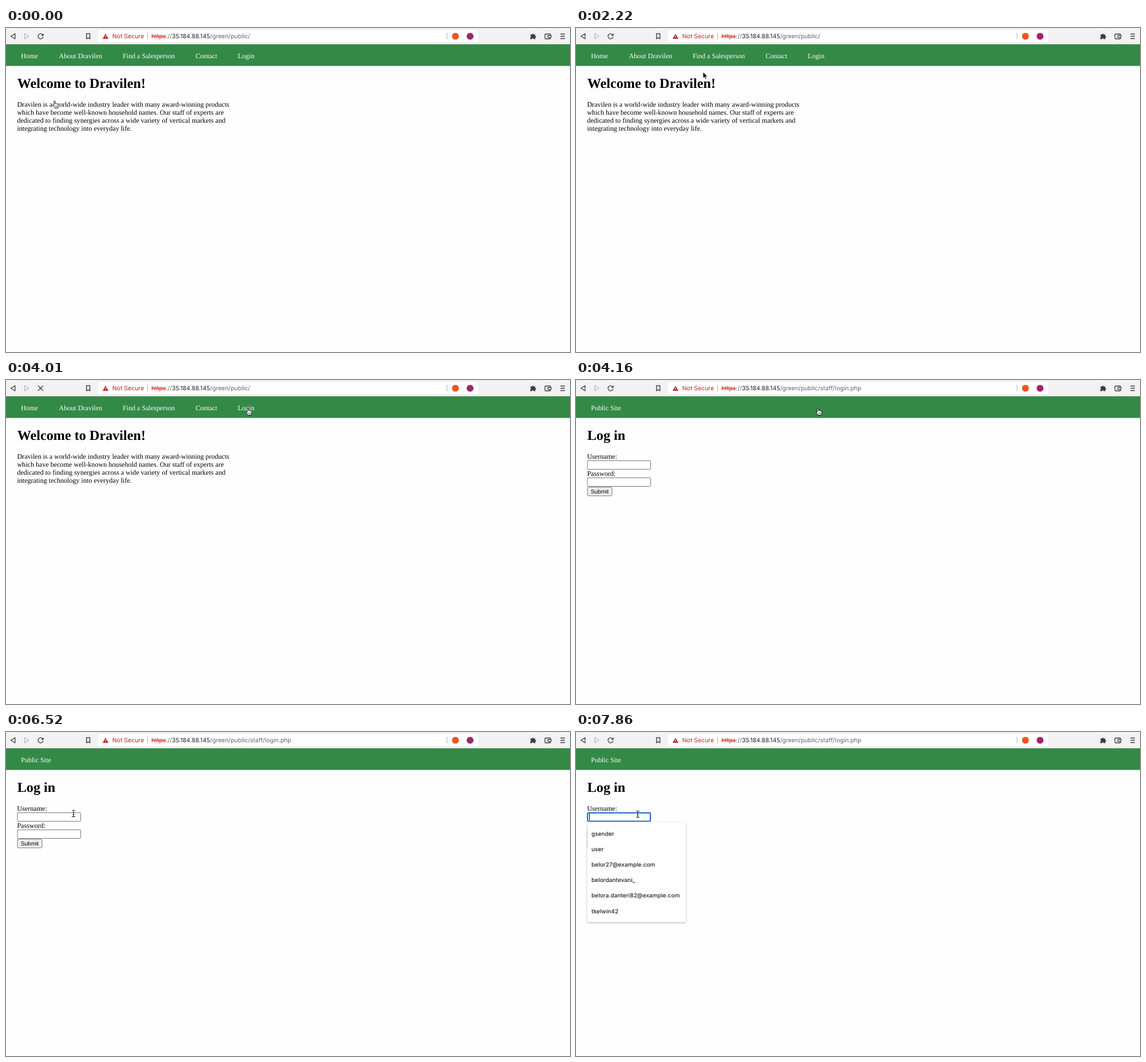
Animation, 986 px wide and 568 px high, one loop 8000 ms. Source, as an HTML page:

```html
<!DOCTYPE html>
<html lang="en">
<head>
<meta charset="utf-8">
<title>Login walkthrough</title>
<style>
html, body { margin: 0; width: 100%; height: 100%; overflow: hidden; background: #fefefe; }
svg { display: block; width: 986px; height: 568px; }
text { font: 12.1px "Liberation Serif", "Times New Roman", serif; text-rendering: geometricPrecision; white-space: pre; }
.nav text { fill: #fff; }
.h1 { font-size: 24.2px; font-weight: 700; }
.ui { font: 10.5px Inter, Roboto, sans-serif; }
.red { fill: #c5221f; }
.dim { fill: #5f6368; }
.host { fill: #202124; }
.btn { font: 10.08px "Liberation Sans", Arial, sans-serif; }
.list text { font: 500 10.1px Inter, Roboto, sans-serif; fill: #1f2023; }
.list rect { fill: #fff; filter: drop-shadow(0 1px 1.5px rgba(0, 0, 0, .32)); }
.line { fill: none; stroke: #3c3c3c; stroke-width: 1.3; }
.field { fill: #fff; stroke: #767676; }
.focus { fill: none; stroke: #1a5cc8; stroke-width: 1.9; }
.tool { fill: #fff; stroke: #000; stroke-width: .9; stroke-linejoin: round; }
</style>
</head>
<body>
<svg viewBox="0 0 986 568">
  <rect width="986" height="568" fill="#fefefe"/>

  <!-- browser bar -->
  <rect width="986" height="29" fill="#f2f2f2"/>
  <rect x="160.500" y="4" width="665" height="21" rx="2.500" fill="#fff"/>
  <path class="line" d="M15.800 10L8.700 14.500L15.800 19Z" stroke-linejoin="round"/>
  <path class="line" d="M32.800 10L39.900 14.500L32.800 19Z" stroke-linejoin="round" style="stroke:#b9b9b9"/>
  <g id="reload">
    <path class="line" d="M64.300 12.100A4.500 4.500 0 1 0 64.900 15.600"/>
    <path d="M65.700 9.600V13.700H61.600Z" fill="#3c3c3c"/>
  </g>
  <path id="stop" class="line" d="M56 10L65 19M65 10L56 19"/>
  <path class="line" d="M140.700 10H146.700V19L143.700 16.700L140.700 19Z" stroke-linejoin="round"/>
  <path d="M174 10L179 19H169Z" fill="#c5221f"/>
  <path d="M174 13V15.900M174 16.700V17.800" stroke="#fff"/>
  <text class="ui red" x="185.700" y="18.300">Not Secure</text>
  <path d="M247.500 9V20" stroke="#c9a9a8"/>
  <text class="ui dim" x="254.300" y="18.300"><tspan class="red" text-decoration="line-through">https</tspan>://<tspan class="host">35.184.88.145</tspan>/green/public/<tspan id="path">staff/login.php</tspan></text>
  <path d="M771 8.500V20" stroke="#b4aeba"/>
  <circle cx="785.700" cy="14.500" r="6" fill="#f1521f"/>
  <circle cx="811.300" cy="14.500" r="6" fill="#a0256b"/>
  <path d="M917 11.400H919.600A1.500 1.500 0 1 1 922.600 11.400H925.200V14A1.500 1.500 0 1 1 925.200 17V19.500H922.500A1.500 1.500 0 0 0 919.500 19.500H916.600V16.700A1.500 1.500 0 0 0 916.600 13.800Z" fill="#3c3c3c"/>
  <rect class="line" x="942.200" y="10.500" width="9.800" height="8.500" rx="1.300"/>
  <rect class="line" x="947.300" y="13" width="5.700" height="3.600" rx=".8" style="fill:#f2f2f2"/>
  <path class="line" d="M969.300 10.500H977M969.300 14.500H977M969.300 18.500H977"/>

  <rect y="28.500" width="986" height="38" fill="#338a46"/>

  <g id="home">
    <g class="nav">
      <text x="26.200" y="52.500">Home</text>
      <text x="92.500" y="52.500">About Dravilen</text>
      <text x="203.900" y="52.500">Find a Salesperson</text>
      <text x="331.500" y="52.500">Contact</text>
      <text x="405.300" y="52.500">Login</text>
    </g>
    <text class="h1" x="19.700" y="104.700">Welcome to Dravilen!</text>
    <text x="19.400" y="138">Dravilen is a world-wide industry leader with many award-winning products</text>
    <text x="19.400" y="152">which have become well-known household names. Our staff of experts are</text>
    <text x="19.400" y="166">dedicated to finding synergies across a wide variety of vertical markets and</text>
    <text x="19.400" y="180">integrating technology into everyday life.</text>
  </g>

  <g id="login">
    <g class="nav"><text x="26.200" y="52.500">Public Site</text></g>
    <text class="h1" x="19.700" y="104.700">Log in</text>
    <text x="19.400" y="138">Username:</text>
    <rect class="field" x="20" y="141.500" width="110.500" height="15" rx="1"/>
    <text x="19.400" y="168">Password:</text>
    <rect class="field" x="20" y="171.500" width="110.500" height="15" rx="1"/>
    <rect class="field" x="20" y="188" width="43" height="15" rx="2" style="fill:#efefef"/>
    <text class="btn" x="25.800" y="199.200">Submit</text>
  </g>

  <g id="focus">
    <rect class="focus" x="20.300" y="141.700" width="109.700" height="14.700" rx="1.200"/>
    <path id="caret" d="M23.500 143V155" stroke="#000"/>
    <g class="list">
      <rect x="19.700" y="158" width="172.300" height="175.500" rx="1.500"/>
      <text x="27" y="181.500">gsender</text>
      <text x="27" y="208.700">user</text>
      <text x="27" y="235.900">belor27@example.com</text>
      <text x="27" y="263.100">belordantevani_</text>
      <text x="27" y="290.300">belora.danteri82@example.com</text>
      <text x="27" y="317.500">tkelwin42</text>
    </g>
  </g>

  <!-- pointers, each drawn around its hot spot -->
  <g id="arrow">
    <path d="M0 0V11.200L2.600 8.900L4.200 12.700L6.200 11.900L4.600 8.200H8Z" fill="#000" stroke="#fff" stroke-width=".9" stroke-linejoin="round"/>
  </g>
  <g id="beam">
    <path d="M-3 -5.700Q-.4 -5.700 0 -4.500Q.4 -5.700 3 -5.700M0 -4.500V4.500M-3 5.700Q-.4 5.700 0 4.500Q.4 5.700 3 5.700M-1.600 1.800H1.600" fill="none" stroke="#222" stroke-width="1.100"/>
  </g>
  <g id="hand">
    <path class="tool" d="M-1.200 8V1a1.100 1.100 0 0 1 2.200 0V5c.2-.9 2-.8 2.100.2c.3-.7 1.800-.6 1.900.4c.4-.6 1.600-.4 1.600.7V8.800c0 1.500-.9 2-.9 3.700H.2c0-1.200-2.900-3.200-3.500-4.800c-.4-1.200 1-1.600 2.100.3z"/>
    <path d="M1.200 8V10.700M2.900 8V10.700M4.500 8V10.700" stroke="#000" stroke-width=".6"/>
  </g>
</svg>
<script>
const LOOP = 8000;
// start time, pointer, x, y
const moves = [
  [0, 'hand', 85, 128],
  [290, 'beam', 135, 131], [440, 'beam', 196, 133], [590, 'beam', 226, 132],
  [1490, 'beam', 229, 130], [1630, 'arrow', 276, 109], [1780, 'beam', 232, 92], [1920, 'beam', 187, 85],
  [2220, 'arrow', 222, 77], [2370, 'arrow', 275, 70], [2510, 'arrow', 317, 66], [2660, 'arrow', 341, 67], [2810, 'arrow', 349, 69],
  [3110, 'arrow', 415, 64],
  [3410, 'hand', 424, 56], [3560, 'hand', 425, 51], [3710, 'hand', 423, 49],
  [4460, 'arrow', 515, 32], [4600, 'beam', 611, 22],
  [4900, 'arrow', 686, 26], [5040, 'arrow', 768, 33], [5190, 'arrow', 790, 33], [5330, 'arrow', 716, 44], [5480, 'beam', 604, 14],
  [5930, 'arrow', 430, 72], [6080, 'arrow', 236, 124], [6230, 'arrow', 148, 143], [6370, 'beam', 123, 143],
  [6520, 'beam', 118, 143], [6670, 'beam', 112, 144], [6810, 'beam', 108, 144]
];
const $ = id => document.getElementById(id);
const show = (id, on) => { $(id).style.display = on ? '' : 'none'; };

function draw(t) {
  const loading = t >= 4010 && t < 4160;
  const login = t >= 4160;
  show('home', !login);
  show('login', login);
  show('path', login);
  show('stop', loading);
  show('reload', !loading);
  show('focus', t >= 6960);
  show('caret', t < 7410 || t >= 7860);

  const [, kind, x, y] = moves.findLast(m => m[0] <= t);
  for (const id of ['arrow', 'beam', 'hand']) show(id, id === kind);
  $(kind).setAttribute('transform', `translate(${x} ${y})`);
}

const start = performance.now();
function tick() {
  draw((performance.now() - start) % LOOP);
  requestAnimationFrame(tick);
}
tick();
</script>
</body>
</html>
```
